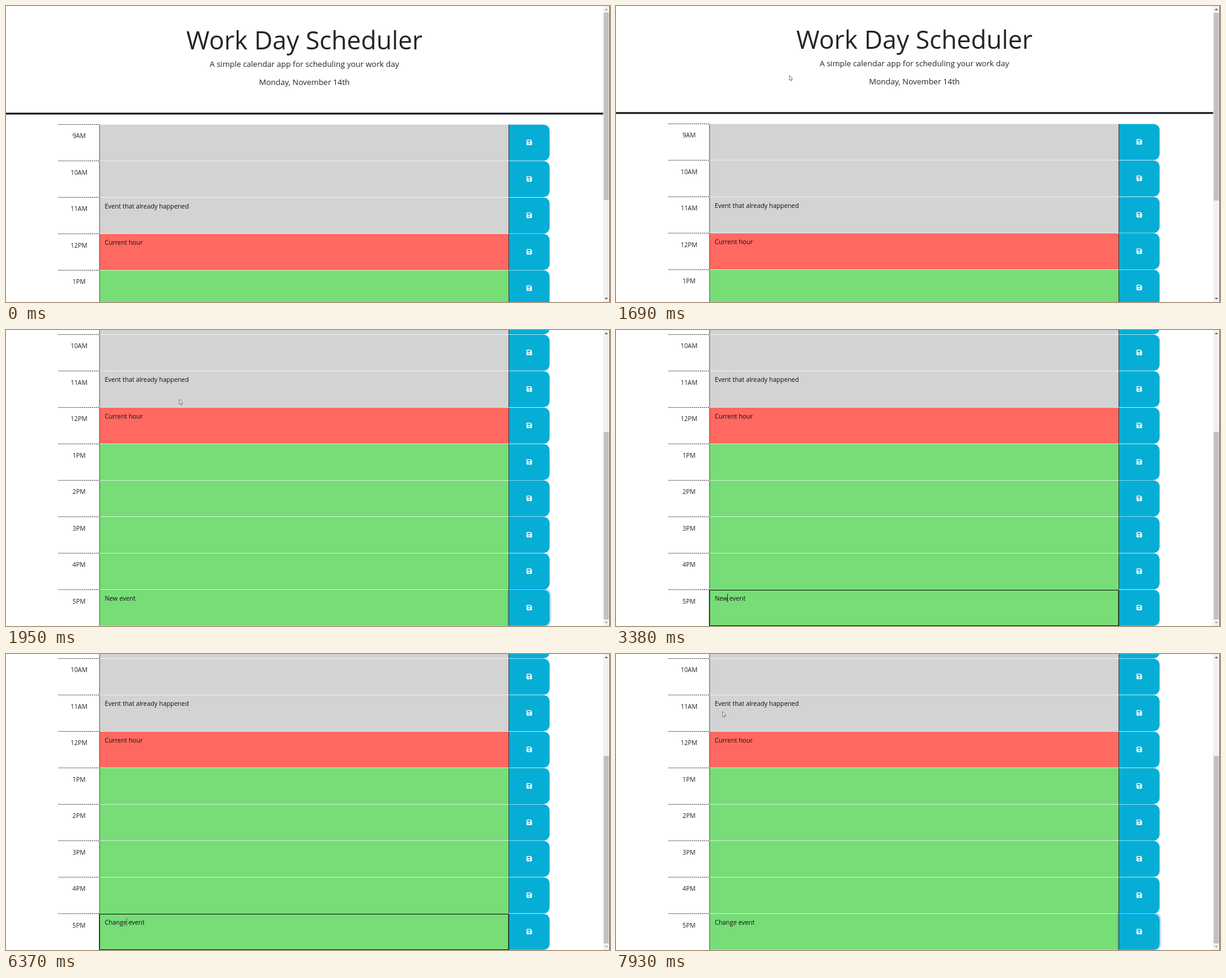
Animation, 1000 px wide and 491 px high, one loop 8 s. Source, as an HTML page with a canvas:

```html
<!DOCTYPE html>
<html lang="en">
<head>
<meta charset="utf-8">
<title>Work Day Scheduler</title>
<style>
  html, body { margin: 0; width: 100%; height: 100%; overflow: hidden; background: #fff; }
  canvas { display: block; }
</style>
</head>
<body>
<canvas id="stage" width="1000" height="491"></canvas>
<script>
const ctx = document.getElementById('stage').getContext('2d');
const LOOP = 8000, STEP = 130;
const SCALE = 0.65, ROW = 60.45, FIRST = 196.1, MAX_SCROLL = 249.4;
const LEFT = 87, COL = 67.75, AREA = LEFT + COL, BTN = AREA + COL * 10, RIGHT = BTN + COL;
const TEXT_X = 163.4, EVENT_BASE = 18.6, HOUR_BASE = 23.2, INK = '#212529', EVENT_INK = '#111';
const PAST = '#d3d3d3', PRESENT = '#ff6961', FUTURE = '#77dd77', BLUE = '#06aed5';
const HOURS = ['9AM', '10AM', '11AM', '12PM', '1PM', '2PM', '3PM', '4PM', '5PM'];
const FOCUS_IN = 3380, SELECT = 3510, TYPE = 4680, SAVE = 7020;

// Pointer legs: start, end, from x, y, to x, y
const LEGS = [
  [130, 520, 800, 440, 560, 300],
  [780, 1170, 560, 300, 287, 115],
  [1170, 3380, 287, 115, 287, 115],
  [3510, 5590, 147.3, 444, 147.3, 444],
  [6500, 7020, 420, 452, 866, 462],
  [7150, 7410, 866, 462, 620, 330],
  [7930, 8000, 176.5, 95.5, 176.5, 95.5]
];

function rect(x, y, w, h, color) {
  ctx.fillStyle = color;
  ctx.fillRect(x, y, w, h);
}

function setFont(size) {
  ctx.font = `400 ${size}px "Open Sans", sans-serif`;
}

function text(str, x, y, size, color = INK, align = 'left') {
  setFont(size);
  ctx.textAlign = align;
  ctx.fillStyle = color;
  ctx.fillText(str, x, y);
}

function polygon(points) {
  ctx.beginPath();
  points.forEach(([x, y]) => ctx.lineTo(x, y));
  ctx.closePath();
}

function scrollAt(t) {
  if (t < 1690) return 0;
  if (t < 1820) return 1;
  if (t < 1950) return 217;
  return MAX_SCROLL;
}

function firstWord(t) {
  if (t < TYPE) return 'New';
  return 'Change'.slice(0, 2 + Math.floor((t - TYPE) / STEP));
}

function caretAlpha(t) {
  if (t < FOCUS_IN || t >= SAVE || (t >= SELECT && t < TYPE)) return 0;
  if (t >= 5590 && t < 5720) return 0;
  return t >= 6370 ? 0.5 : 0.9;
}

function drawHeader() {
  text('Work Day Scheduler', 494, 72, 64 * SCALE, INK, 'center');
  text('A simple calendar app for scheduling your work day', 494, 100.5, 20 * SCALE, INK, 'center');
  text('Monday, November 14th', 494, 130.5, 20 * SCALE, INK, 'center');
  rect(0, 176.9, 989, 3.2, '#24242e');
}

function drawDisk(x, y) {
  ctx.fillStyle = '#fff';
  ctx.beginPath();
  ctx.moveTo(x - 3.6, y - 4.5);
  ctx.lineTo(x + 2.3, y - 4.5);
  ctx.lineTo(x + 4.5, y - 2.3);
  ctx.lineTo(x + 4.5, y + 3.6);
  ctx.arcTo(x + 4.5, y + 4.5, x + 3.6, y + 4.5, 0.9);
  ctx.lineTo(x - 3.6, y + 4.5);
  ctx.arcTo(x - 4.5, y + 4.5, x - 4.5, y + 3.6, 0.9);
  ctx.lineTo(x - 4.5, y - 3.6);
  ctx.arcTo(x - 4.5, y - 4.5, x - 3.6, y - 4.5, 0.9);
  ctx.fill();
  rect(x - 3.1, y - 3.2, 5.2, 2.4, BLUE);
  ctx.beginPath();
  ctx.arc(x, y + 1.7, 1.35, 0, Math.PI * 2);
  ctx.fill();
}

function drawButton(y, focused) {
  const h = ROW - 0.65;
  if (focused) {
    ctx.fillStyle = 'rgba(13,110,253,.25)';
    ctx.beginPath();
    ctx.roundRect(BTN - 2.6, y - 2, COL + 5.2, h + 4.6, [0, 12, 12, 0]);
    ctx.fill();
  }
  ctx.fillStyle = BLUE;
  ctx.beginPath();
  ctx.roundRect(BTN, y + 0.65, RIGHT - BTN, h, [0, 9.75, 9.75, 0]);
  ctx.fill();
  rect(BTN - 0.2, y + 0.65, 0.8, h, '#222');
  drawDisk(866.3, y + 30.2);
}

function drawEvent(y, t) {
  const size = 16 * SCALE, word = firstWord(t), selected = t >= SELECT && t < TYPE;
  setFont(size);
  const width = ctx.measureText(word).width;
  if (selected) rect(TEXT_X, y + 7.5, width, 14.5, '#3390ff');
  text(word + ' event', TEXT_X, y + EVENT_BASE, size, EVENT_INK);
  if (selected) text(word, TEXT_X, y + EVENT_BASE, size, '#fff');
  rect(TEXT_X + width - 0.6, y + 7.5, 0.9, 14, `rgba(0,0,0,${caretAlpha(t)})`);
}

function drawRow(i, y, t) {
  const last = i === HOURS.length - 1;
  const color = i < 3 ? PAST : i === 3 ? PRESENT : FUTURE;
  ctx.setLineDash([1.95, 1.3]);
  ctx.strokeStyle = '#111';
  ctx.lineWidth = 0.9;
  ctx.beginPath();
  ctx.moveTo(LEFT, y + 0.4);
  ctx.lineTo(AREA, y + 0.4);
  ctx.stroke();
  ctx.setLineDash([]);
  text(HOURS[i], LEFT + COL / 2, y + HOUR_BASE, 16 * SCALE, INK, 'center');

  rect(AREA, y + 0.65, BTN - AREA, ROW - 0.65, color);
  rect(AREA - 0.2, y + 0.65, 0.8, ROW - 0.65, '#333');
  if (i === 2) text('Event that already happened', TEXT_X, y + EVENT_BASE, 16 * SCALE, EVENT_INK);
  if (i === 3) text('Current hour', TEXT_X, y + EVENT_BASE, 16 * SCALE, EVENT_INK);
  if (last) drawEvent(y, t);
  drawButton(y, last && (t < FOCUS_IN || t >= SAVE));

  if (last && t >= FOCUS_IN && t < SAVE) {
    ctx.strokeStyle = '#101010';
    ctx.lineWidth = 1.3;
    ctx.beginPath();
    ctx.roundRect(154.6, y + 1.1, 677.6, 59.3, 1.3);
    ctx.stroke();
  }
}

function drawScrollbar(scroll) {
  const arrow = (y, dir, active) => {
    polygon([[991.4, y + dir * 1.5], [996.4, y + dir * 1.5], [993.9, y - dir * 1.5]]);
    ctx.fillStyle = active ? '#505050' : '#a3a3a3';
    ctx.fill();
  };
  rect(988.6, 0, 11.4, 491, '#f1f1f1');
  rect(989.6, 11 + scroll / MAX_SCROLL * 158, 8.6, 311, '#c1c1c1');
  arrow(5.5, 1, scroll > 0);
  arrow(485.5, -1, scroll < MAX_SCROLL);
  rect(999.2, 0, 0.8, 491, '#333');
}

function drawPointer(t) {
  // The pointer rests at the end of a leg until the next one starts.
  const leg = LEGS.findLast(([start]) => t >= start);
  if (!leg) return;
  const [start, end, x0, y0, x1, y1] = leg;
  const hidden = t >= end && (end === FOCUS_IN || end === 5590);
  if (hidden) return;
  const p = Math.min(1, (t - start) / (end - start));
  const ease = p * p * (3 - 2 * p);
  ctx.save();
  ctx.translate(x0 + (x1 - x0) * ease, y0 + (y1 - y0) * ease);
  polygon([[0, 0], [0, 8.2], [1.8, 6.6], [3, 9.3], [4.3, 8.7], [3.2, 6.1], [5.6, 5.9]]);
  ctx.fillStyle = '#fff';
  ctx.fill();
  ctx.strokeStyle = '#444';
  ctx.lineWidth = 0.7;
  ctx.stroke();
  ctx.restore();
}

function draw(time) {
  const t = Math.floor((time % LOOP) / STEP) * STEP;
  const scroll = scrollAt(t);
  rect(0, 0, 1000, 491, '#fff');
  ctx.save();
  ctx.translate(0, -scroll);
  drawHeader();
  HOURS.forEach((_, i) => drawRow(i, FIRST + i * ROW, t));
  ctx.restore();
  drawScrollbar(scroll);
  drawPointer(t);
}

const origin = performance.now();
function tick() {
  draw(performance.now() - origin);
  requestAnimationFrame(tick);
}
tick();
</script>
</body>
</html>
```
